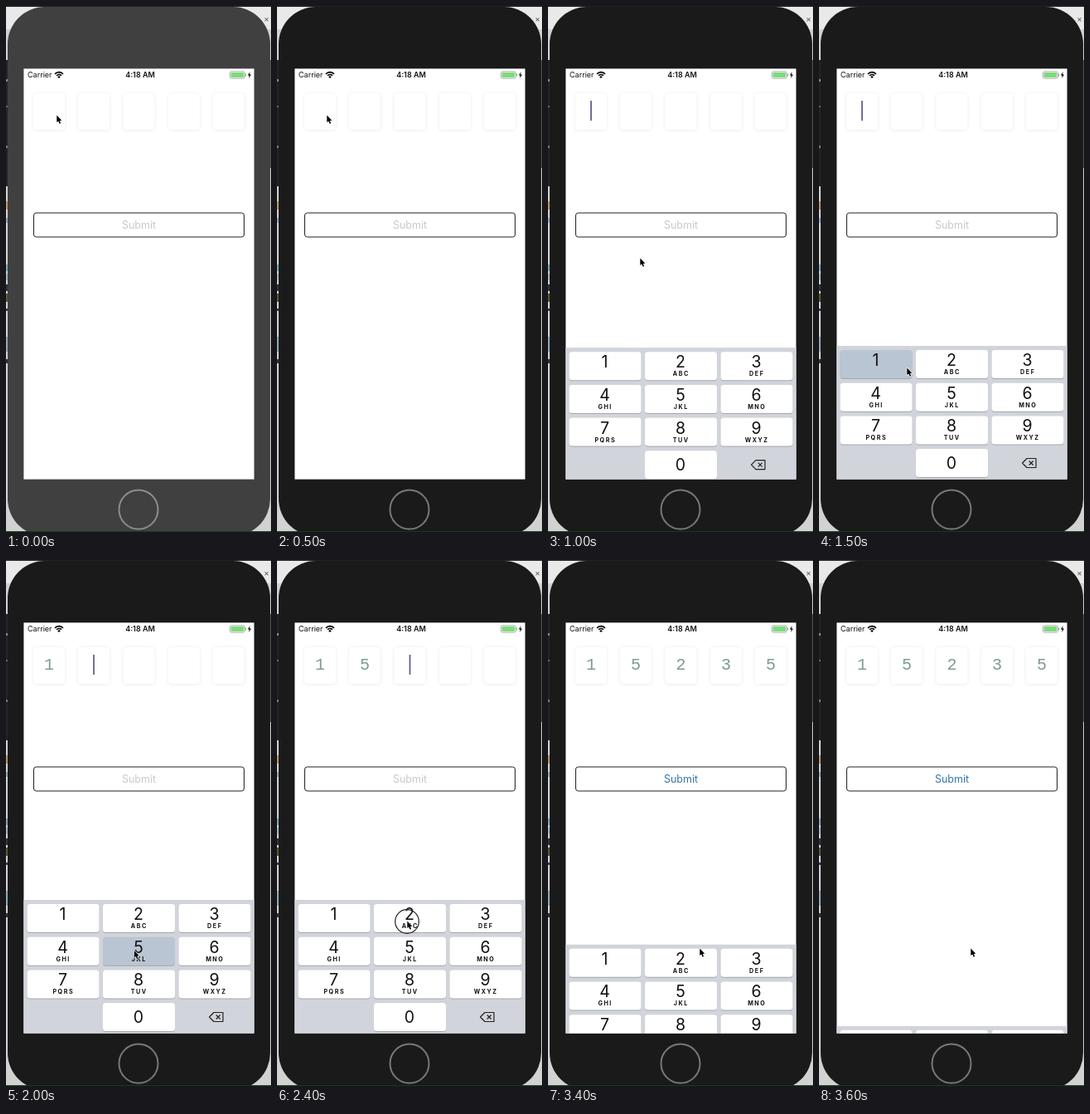
An HTML page with a canvas for the animation above (3.7 s loop, 320 by 633 pixels).

```html
<!DOCTYPE html>
<html lang="en">
<head>
<meta charset="utf-8">
<title>Passcode entry</title>
<style>
html, body { margin: 0; width: 320px; height: 633px; overflow: hidden; background: #d8d8d8; }
canvas { display: block; }
</style>
</head>
<body>
<canvas id="stage" width="320" height="633"></canvas>
<script>
const ctx = document.getElementById('stage').getContext('2d');
const LOOP = 3700, STEP = 100;
const UI = 'Inter, Roboto, sans-serif';
const MONO = '"Liberation Mono", monospace';
const BOX_X = [52, 106, 160.5, 215, 269];
const KEY_X = [25.5, 117, 208.5];
const LETTERS = ['', 'ABC', 'DEF', 'GHI', 'JKL', 'MNO', 'PQRS', 'TUV', 'WXYZ'];
const PANEL_H = 161;

// Each tap: the digit, when its key lights up and when the digit appears.
const TAPS = [
  { digit: 1, press: 1500, typed: 1600 },
  { digit: 5, press: 2000, typed: 2100 },
  { digit: 2, press: 2500, typed: 2600 },
  { digit: 3, press: 2900, typed: 3000 },
  { digit: 5, press: 3300, typed: 3400 }
];
const FOCUS = 700, DONE = 3400, SHOW = 630, HIDE = 3330;

// Pointer path: time, x, y.
const PATH = [
  [0, 61, 131], [200, 60, 131], [600, 60, 131], [1000, 111, 303],
  [1400, 106, 435], [1600, 106, 435], [1900, 154, 470], [2100, 155, 469],
  [2400, 157, 434], [2600, 157, 434], [2800, 236, 435], [3000, 236, 435],
  [3200, 183, 467], [LOOP, 183, 467]
];

function rect(x, y, w, h, color) {
  ctx.fillStyle = color;
  ctx.fillRect(x, y, w, h);
}

function round(x, y, w, h, r) {
  ctx.beginPath();
  ctx.roundRect(x, y, w, h, r);
}

function text(str, x, y, font, color, align = 'center', spacing = 0) {
  ctx.font = font;
  ctx.fillStyle = color;
  ctx.textAlign = align;
  ctx.letterSpacing = spacing + 'px';
  ctx.fillText(str, x + spacing / 2, y);
  ctx.letterSpacing = '0px';
}

function shape(points, x = 0, y = 0) {
  ctx.beginPath();
  points.forEach(([px, py]) => ctx.lineTo(x + px, y + py));
  ctx.closePath();
}

function ring(x, y, r, width, color) {
  ctx.beginPath();
  ctx.arc(x, y, r, 0, Math.PI * 2);
  ctx.lineWidth = width;
  ctx.strokeStyle = color;
  ctx.stroke();
}

function spring(ms) {
  const a = Math.max(0, ms) * 0.017;
  return 1 - (1 + a) * Math.exp(-a);
}

function pointerAt(t) {
  const i = PATH.findIndex(p => p[0] > t);
  const [t0, x0, y0] = PATH[i - 1], [t1, x1, y1] = PATH[i];
  const u = (t - t0) / (t1 - t0), k = u * u * (3 - 2 * u);
  return [x0 + (x1 - x0) * k, y0 + (y1 - y0) * k];
}

function drawDesktop() {
  rect(0, 0, 320, 633, '#d2d2d2');
  rect(0, 0, 320, 28, '#e9e9e9');
  rect(0, 0, 320, 1, '#222');
  text('×', 314.5, 19, '10px ' + UI, '#555');
  rect(0, 65, 3, 152, '#242424');
  rect(0, 88, 3, 3, '#888');
  rect(0, 120, 3, 2, '#666');
  rect(0, 168, 3, 3, '#777');
  rect(0, 235, 3, 10, '#b79a67');
  rect(0, 255, 3, 6, '#86aec4');
  rect(0, 311, 3, 8, '#79aabd');
  rect(0, 322, 3, 8, '#9db8d0');
  rect(0, 335, 3, 8, '#30343c');
  rect(0, 346, 3, 10, '#5b5930');
  rect(0, 364, 3, 3, '#39395f');
  rect(0, 398, 3, 18, '#8fa8ba');
  rect(0, 425, 2, 5, '#333');
  rect(318, 65, 2, 130, '#555');
}

function drawPhone(active) {
  ctx.fillStyle = active ? '#1a1a1a' : '#404040';
  round(2, 1, 317, 637, 45);
  ctx.fill();
  ring(160, 606, 23.5, 2, active ? '#777' : '#8c8c8c');
  rect(0, 632, 320, 1, '#123f12');
  rect(21.4, 75.4, 278.2, 494.2, '#fff');
}

function drawStatus() {
  text('Carrier', 26, 86, '9px ' + UI, '#111', 'left');
  text('4:18 AM', 162, 86, '600 9px ' + UI, '#111');

  ctx.strokeStyle = '#000';
  ctx.lineWidth = 1.7;
  for (const r of [4, 6.8]) {
    ctx.beginPath();
    ctx.arc(64, 86.5, r, -Math.PI * 0.76, -Math.PI * 0.24);
    ctx.stroke();
  }
  ctx.fillStyle = '#000';
  ctx.beginPath();
  ctx.moveTo(64, 87);
  ctx.arc(64, 87, 2.5, -Math.PI * 0.76, -Math.PI * 0.24);
  ctx.fill();

  ctx.lineWidth = 0.8;
  ctx.strokeStyle = '#999';
  round(270.4, 78.8, 18, 8.4, 2);
  ctx.stroke();
  ctx.fillStyle = '#7bdc7c';
  round(271.5, 80, 15.8, 6, 1);
  ctx.fill();
  rect(289.2, 81.5, 1, 3, '#999');
  ctx.fillStyle = '#000';
  shape([[2.6, 0], [0, 4.5], [1.8, 4.5], [1.2, 8], [4, 3.4], [2.1, 3.4]], 292, 79);
  ctx.fill();
}

function drawBoxes(t) {
  for (const x of BOX_X) {
    ctx.save();
    ctx.shadowColor = 'rgba(0,0,0,.09)';
    ctx.shadowBlur = 4;
    ctx.shadowOffsetY = 0.5;
    ctx.fillStyle = '#fff';
    round(x - 19, 105, 38, 44, 4);
    ctx.fill();
    ctx.restore();
  }
  const count = TAPS.filter(tap => t >= tap.typed).length;
  TAPS.slice(0, count).forEach((tap, i) =>
    text(tap.digit, BOX_X[i], 132, '20px ' + MONO, '#7c9a94'));
  if (t >= FOCUS && t < DONE) rect(BOX_X[count] - 0.9, 114, 1.8, 24, '#62628a');
}

function drawSubmit(enabled) {
  ctx.strokeStyle = '#222';
  ctx.lineWidth = 1;
  round(33.5, 249, 254, 29, 3);
  ctx.stroke();
  text('Submit', 160.5, 268, '12.5px ' + UI, enabled ? '#3675a9' : '#c9c9c9');
}

function drawKey(n, top, pressed) {
  const i = n ? n - 1 : 10;
  const x = KEY_X[i % 3], y = top + 5 + Math.floor(i / 3) * 39.7;
  ctx.fillStyle = '#a4a7ad';
  round(x, y + 1, 87, 34, 3.5);
  ctx.fill();
  ctx.fillStyle = pressed ? '#b9c5d2' : '#fff';
  round(x, y, 87, 34, 3.5);
  ctx.fill();
  text(n, x + 43, y + (n ? 19 : 24), '19.5px ' + UI, '#111');
  if (n > 1) text(LETTERS[n - 1], x + 43, y + 29, '700 7.2px ' + UI, '#111', 'center', 1.5);
}

function drawBackspace(x, y) {
  ctx.strokeStyle = '#222';
  ctx.lineWidth = 1.2;
  ctx.lineJoin = 'round';
  shape([[-8.5, 0], [-3, -5.5], [8, -5.5], [8, 5.5], [-3, 5.5]], x, y);
  ctx.stroke();
  ctx.beginPath();
  for (const s of [-1, 1]) {
    ctx.moveTo(x - 0.3, y - 2.5 * s);
    ctx.lineTo(x + 4.7, y + 2.5 * s);
  }
  ctx.stroke();
}

function drawKeyboard(t) {
  const shown = spring(t - SHOW) - spring(t - HIDE);
  if (shown <= 0.002) return;
  const top = 570 - PANEL_H * shown;
  ctx.save();
  ctx.beginPath();
  ctx.rect(21.4, 75.4, 278.2, 494.2);
  ctx.clip();
  rect(21, top, 279, PANEL_H + 1, '#d1d4da');
  const held = TAPS.find(tap => t >= tap.press && t < tap.typed);
  for (let n = 0; n < 10; n++) drawKey(n, top, held && held.digit === n);
  drawBackspace(254, top + 141);
  ctx.restore();
}

function drawPointer(t) {
  const [x, y] = pointerAt(t);
  if (TAPS.some(tap => t >= tap.press - 100 && t < tap.press)) {
    ring(x, y + 1, 14.3, 1.2, '#222');
  }
  shape([[0, 0], [0, 8.6], [1.9, 6.9], [3.4, 10.2], [4.8, 9.6], [3.5, 6.4], [6, 6.2]], x + 0.3, y + 0.5);
  ctx.lineJoin = 'round';
  ctx.lineWidth = 1.2;
  ctx.strokeStyle = '#fff';
  ctx.stroke();
  ctx.fillStyle = '#000';
  ctx.fill();
}

function draw(t) {
  drawDesktop();
  drawPhone(t >= 500);
  drawStatus();
  drawBoxes(t);
  drawSubmit(t >= DONE);
  drawKeyboard(t);
  drawPointer(t);
}

let start;
function tick(now) {
  start ??= now;
  draw(Math.floor(((now - start) % LOOP) / STEP) * STEP);
  requestAnimationFrame(tick);
}
draw(0);
requestAnimationFrame(tick);
</script>
</body>
</html>
```
